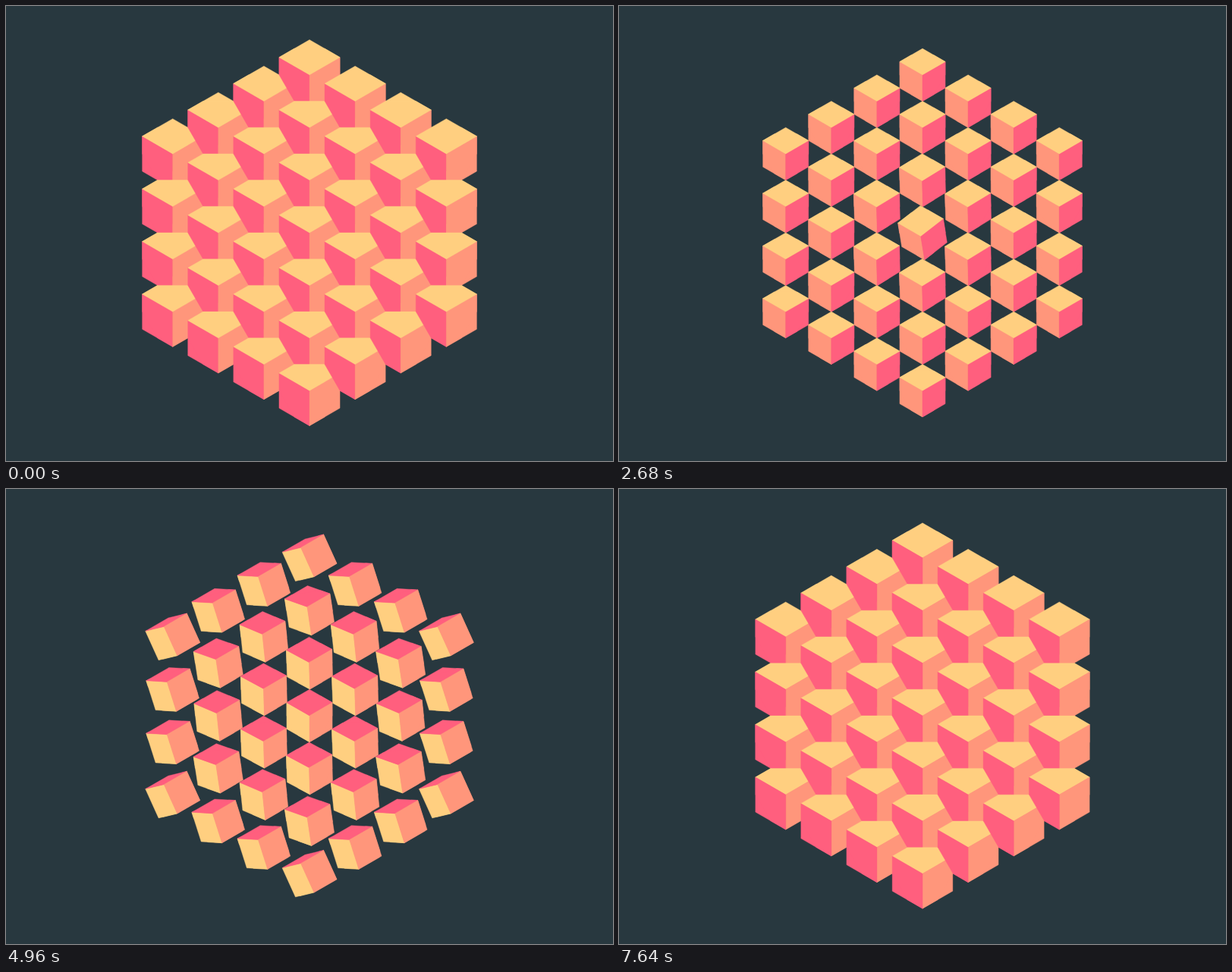
These frames come from a looping animation (800x600 px, 7840 ms). An HTML page with a canvas:

```html
<!DOCTYPE html>
<html lang="en">
<head>
<meta charset="utf-8">
<title>Turning cubes</title>
<style>
  html, body { margin: 0; width: 100%; height: 100%; overflow: hidden; background: #28383f; }
  canvas { display: block; }
</style>
</head>
<body>
<canvas id="stage" width="800" height="600"></canvas>
<script>
const ctx = document.getElementById('stage').getContext('2d');
const BACKGROUND = '#28383f', PINK = '#ff5f7e', SALMON = '#ff967b', YELLOW = '#ffcf80';

const LOOP = 7840, TURN = LOOP / 4, FRAME = 40, LEAD = 62;
const HOLDS = [1720, 3640, 5720, 7640], HOLD_TIME = 200;
const DELAY = 0.12;                    // per lattice step away from the centre
const STAGE_TIME = TURN / (3 + 3 * DELAY); // shrink, turn and grow last equally long
const CX = 400, CY = 299, HALF_EDGE = 21.25;
const PITCH = HALF_EDGE * 2 * Math.sqrt(8 / 3);

// Isometric axes as screen x, screen y and depth towards the viewer
const X = Math.SQRT1_2, Y = 1 / Math.sqrt(6), Z = 1 / Math.sqrt(3);
const AXES = [[-X, Y, Z], [X, Y, Z], [0, -2 * Y, Z]];
const LEFT = 0, RIGHT = 1, TOP = 2;

const turns = [
  { colors: [PINK, SALMON, YELLOW], from: LEFT, to: RIGHT },
  { colors: [SALMON, PINK, YELLOW], from: TOP, to: LEFT },
  { colors: [YELLOW, PINK, SALMON], from: TOP, to: RIGHT },
  { colors: [YELLOW, SALMON, PINK], from: LEFT, to: TOP }
];

const cells = [];
for (let q = -3; q <= 3; q++) {
  for (let r = -3; r <= 3; r++) {
    if (Math.abs(q + r) > 3) continue;
    const x = q * PITCH * Math.sqrt(3) / 2, y = (r + q / 2) * PITCH;
    cells.push({ x: CX + x, y: CY + y, distance: Math.hypot(x, y) / PITCH });
  }
}

const clamp = v => Math.min(1, Math.max(0, v));
const ease = v => {
  const u = clamp(v);
  return u < 0.5 ? 8 * u ** 4 : 1 - 8 * (1 - u) ** 4;
};
const mix = (a, b, p, q) => a.map((v, i) => v * p + b[i] * q);

function cubeFaces(cell, turn, local) {
  const phase = local / STAGE_TIME - DELAY * cell.distance;
  const scale = 4 / 3 - (ease(phase) - ease(phase - 2)) / 3;
  const angle = ease(phase - 1) * Math.PI / 2;
  const c = Math.cos(angle), s = Math.sin(angle), h = HALF_EDGE * scale;
  const axes = AXES.slice();
  axes[turn.from] = mix(AXES[turn.from], AXES[turn.to], c, s);
  axes[turn.to] = mix(AXES[turn.to], AXES[turn.from], c, -s);

  return axes.map((axis, i) => {
    const side = axis[2] < 0 ? -1 : 1;
    const a = axes[(i + 1) % 3], b = axes[(i + 2) % 3];
    const points = [[1, 1], [1, -1], [-1, -1], [-1, 1]].map(([m, n]) => {
      const p = axis.map((v, k) => h * (v * side + a[k] * m + b[k] * n));
      return [cell.x + p[0], cell.y + p[1], p[2]];
    });
    return { points, color: turn.colors[i], facing: Math.abs(axis[2]) };
  }).filter(face => face.facing > 1e-4);
}

// Keeps the part of a face that lies in front of the plane of the centres
function frontPart(points) {
  const kept = [];
  points.forEach((p, i) => {
    const next = points[(i + 1) % points.length];
    if (p[2] >= 0) kept.push(p);
    if (p[2] >= 0 !== next[2] >= 0) {
      const f = p[2] / (p[2] - next[2]);
      kept.push(mix(p, next, 1 - f, f));
    }
  });
  return kept;
}

function fillFace(points, color) {
  if (points.length < 3) return;
  ctx.beginPath();
  points.forEach(p => ctx.lineTo(p[0], p[1]));
  ctx.closePath();
  ctx.fillStyle = ctx.strokeStyle = color;
  ctx.fill();
  ctx.stroke();
}

function draw(ms) {
  let t = Math.floor(ms % LOOP / FRAME) * FRAME;
  const hold = HOLDS.find(start => t >= start && t < start + HOLD_TIME);
  if (hold !== undefined) t = hold;
  t = (t + LEAD) % LOOP;

  const turn = turns[Math.floor(t / TURN)];
  const faces = cells.flatMap(cell => cubeFaces(cell, turn, t % TURN));
  ctx.fillStyle = BACKGROUND;
  ctx.fillRect(0, 0, 800, 600);
  ctx.lineWidth = 0.4;
  ctx.lineJoin = 'round';
  // Near halves go over everything, so overlaps can run in a circle
  faces.forEach(face => fillFace(face.points, face.color));
  faces.forEach(face => fillFace(frontPart(face.points), face.color));
}

const begin = performance.now();
function tick() {
  draw(performance.now() - begin);
  requestAnimationFrame(tick);
}
tick();
</script>
</body>
</html>
```
